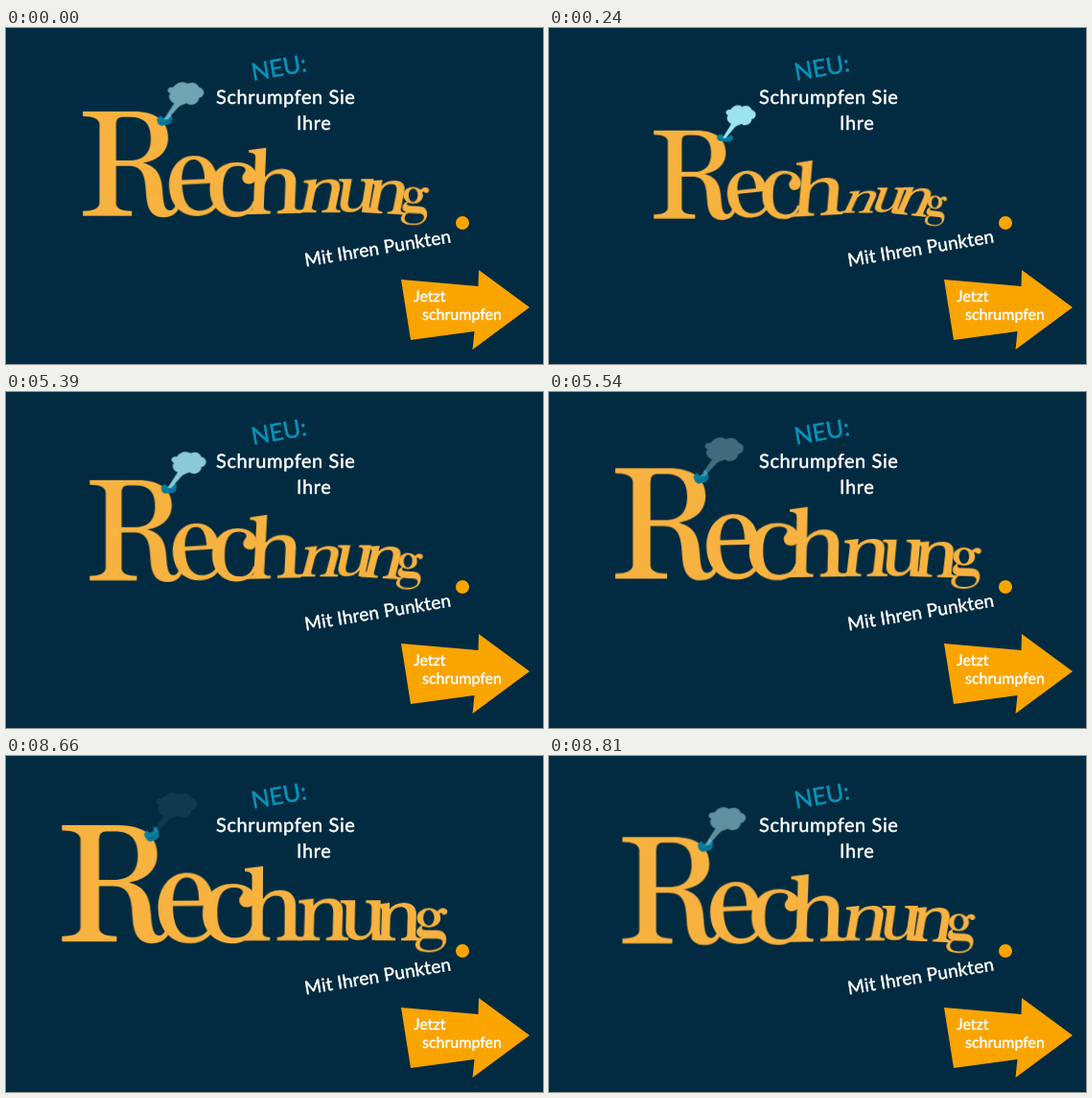
An HTML page that plays this animation: 560x350 px, repeating every 8.84 s.

```html
<!DOCTYPE html>
<html lang="de">
<head>
<meta charset="utf-8">
<title>Schrumpfen Sie Ihre Rechnung</title>
<style>
  html, body { margin: 0; width: 100%; height: 100%; overflow: hidden; background: #022b41; }
  svg { display: block; width: 560px; height: 350px; }
  text { text-rendering: geometricPrecision; }

  .copy { font-family: Lato, "Open Sans", sans-serif; fill: #fff; stroke: #fff; stroke-width: .45; }
  .lead { font-size: 20px; letter-spacing: .6px; }
  .tag { font-size: 25px; fill: #0993b9; stroke: #0993b9; }
  .claim { font-size: 19px; letter-spacing: .2px; }
  .button { font-size: 16px; }
  .accent { fill: #faa400; }
  .word { fill: #f8b23f; }

  /* The cycle starts 210 ms into the shrinking phase. */
  .pose { animation: shrink 8840ms -210ms infinite linear; }
  .smoke { animation: puff 8840ms -210ms infinite linear; }

  @keyframes shrink {
    0% { transform: var(--big); animation-timing-function: steps(15, end); }
    5.0905%, 61.3122% { transform: var(--small); }
    61.3122% { animation-timing-function: steps(15, end); }
    66.4027%, 100% { transform: var(--big); }
  }
  @keyframes puff {
    0% { opacity: 0; fill: #a5bfca; animation-timing-function: steps(10, end); }
    3.3937%, 63.009% { opacity: 1; fill: #9ce2ef; }
    63.009% { animation-timing-function: steps(10, end); }
    66.4027%, 100% { opacity: 0; fill: #a5bfca; }
  }

  .r  { --big: translate(51px, 193px) scale(1.87, 1.87);
        --small: translate(106.5px, 198.5px) scale(1.39, 1.39); }
  .e  { --big: translate(153px, 193.4px) rotate(0deg) scale(1.5, 1.6);
        --small: translate(186px, 199px) rotate(-6deg) scale(1.05, 1.04); }
  .c  { --big: translate(200px, 193.6px) rotate(0deg) scale(1.5, 1.34);
        --small: translate(219px, 197px) rotate(2deg) scale(1.06, 1.07); }
  .h  { --big: translate(247px, 192px) rotate(0deg) skewX(0deg) scale(1.28, 1.16);
        --small: translate(252px, 197px) rotate(-3deg) skewX(-8deg) scale(1.11, .85); }
  .n1 { --big: translate(303px, 192px) skewX(0deg) scale(1.13, .98);
        --small: translate(303px, 192.5px) skewX(-25deg) scale(.7, .5); }
  .u  { --big: translate(348px, 191px) skewX(0deg) scale(1.04, .93);
        --small: translate(333px, 191.5px) skewX(-20deg) scale(.7, .56); }
  .n2 { --big: translate(386px, 192px) rotate(0deg) skewX(0deg) scale(1.02, .87);
        --small: translate(357px, 193px) rotate(6deg) skewX(-18deg) scale(.74, .64); }
  .g  { --big: translate(427px, 189px) rotate(0deg) scale(.79, .69);
        --small: translate(391px, 195px) rotate(6deg) scale(.48, .47); }

  .valve { --big: translate(150px, 80px) rotate(-30deg) scale(.9, 1.5);
           --small: translate(183px, 115px) rotate(5deg) scale(1, .85); }
  .plume { --big: translate(150px, 79px) scale(1.14, 1.02);
           --small: translate(181px, 115.5px) scale(.82, .82); }
</style>
</head>
<body>
<svg viewBox="0 0 560 350">
  <rect width="560" height="350" fill="#022b41"/>

  <g class="copy">
    <text class="tag" transform="translate(257.5 55) rotate(-10)">NEU:</text>
    <text class="lead" x="219" y="79">Schrumpfen Sie</text>
    <text class="lead" x="303" y="106">Ihre</text>
    <text class="claim" transform="translate(312.5 248.5) rotate(-9.4)">Mit Ihren Punkten</text>
  </g>

  <!-- Hand-drawn lettering: 100 units per em, baseline at zero -->
  <defs>
    <path id="n" d="M1 0V-3Q7-3 7-7V-37Q7-41 1-41V-44L15-46V-38Q20-46 30-46C38-46 43-41 43-32V-7Q43-3 49-3V0H28V-3Q34-3 34-7V-30C34-37 32-41 27-41C20-41 16-35 16-27V-7Q16-3 22-3V0Z"/>
  </defs>
  <g class="word" role="img" aria-label="Rechnung">
    <path class="pose r" d="M2 0V-3Q12-3 12.5-8V-58Q12-63 2-63V-66H34C48-66 56-60 56-49.5C56-40 49-35 40-33.5C50-31 52-24 52.5-15C53-7 54-3.5 57-3.5C60-3.5 61-7 61.5-10L64-9.5C63-2 59 1 53 1C45 1 42.5-5 42-14C41.5-25 40-31.5 31-31.5H23V-8Q23-3 33-3V0Z
      M23-35H31C41-35 45-40 45-49C45-58 41-62.5 32-62.5H27Q23-62.5 23-58Z"/>
    <path class="pose e" d="M42-24H13C13-10 18-3 27-3C34-3 38-7 40.5-12L43-11C40-3 34 1 25 1C11 1 2.5-9 2.5-22.5C2.5-36 11-46 23-46C35-46 42-37 42-24Z
      M13-27.5H31.5C31.5-37 29-43 23-43C17-43 13.5-37 13-27.5Z"/>
    <path class="pose c" d="M40-12C38-4 32 1 23.5 1C11 1 2.5-9 2.5-22.5C2.5-36 11.5-46 24-46C33-46 40-41 40-34C40-30 37-27.5 34-27.5C30.5-27.5 28.5-30 28.5-33C28.5-36 31-37 31-39.5C31-42 28-43 24.5-43C16.5-43 13-36 13-23C13-10 17-3.5 25.5-3.5C32-3.5 36-7 37.5-13Z"/>
    <path class="pose h" d="M1 0V-3Q7-3 7-7V-59Q7-63 1-63.5V-66L16-68V-38Q21-46 30-46C38-46 43-41 43-32V-7Q43-3 49-3V0H28V-3Q34-3 34-7V-30C34-37 32-41 27-41C20-41 16-35 16-27V-7Q16-3 22-3V0Z"/>
    <use class="pose n1" href="#n"/>
    <path class="pose u" d="M1-45H16V-15C16-8 18-4 23-4C30-4 33-10 33-18V-37Q33-42 27-42V-45H42V-8Q42-3 48-3V0L34 1V-8Q29 1 20 1C12 1 7-4 7-13V-37Q7-42 1-42Z"/>
    <use class="pose n2" href="#n"/>
    <path class="pose g" d="M5-31A16 15 0 1 1 37-31A16 15 0 1 1 5-31Z
      M13.5-31A7.5 12 0 1 0 28.5-31A7.5 12 0 1 0 13.5-31Z
      M32-40C35-46 40-47 44-45C48-42 46-36 42-36C38-36 39-41 36-38L34-36Z
      M14-19C10-16 11-12 17-12H31C41-12 45-6 45 2C45 14 35 22 21 22C9 22 3 17 3 11C3 6 6 2 11 0C2-4 3-14 11-19Z
      M14 1C11 3 9 6 9 10C9 16 14 19 22 19C33 19 40 14 40 7C40 2 36 1 31 1Z"/>
  </g>

  <g class="pose valve">
    <path fill="#087f9f" d="M-8-3L-3-5-1-2H4L6-5 9-3Q9 3 4 4H-4Q-9 3-8-3Z"/>
    <path fill="none" stroke="#066583" d="M-6 1Q0 3 7 1"/>
  </g>
  <g class="pose plume">
    <path class="smoke" d="M0-1L11-19C6-21 4-27 7-30C2-32 4-38 10-37C14-43 20-44 25-41C31-44 36-41 37-37C45-35 43-26 37-25C37-19 29-15 24-19C20-17 17-17 15-14L4-1Z"/>
  </g>

  <circle class="accent" cx="476" cy="203" r="7"/>
  <path class="accent" d="M412 262L492.5 269 493 252 546 291 486.5 335 488.5 316 422 325Z"/>
  <g class="copy button">
    <text x="425" y="285">Jetzt</text>
    <text x="434" y="304">schrumpfen</text>
  </g>
</svg>
</body>
</html>
```
